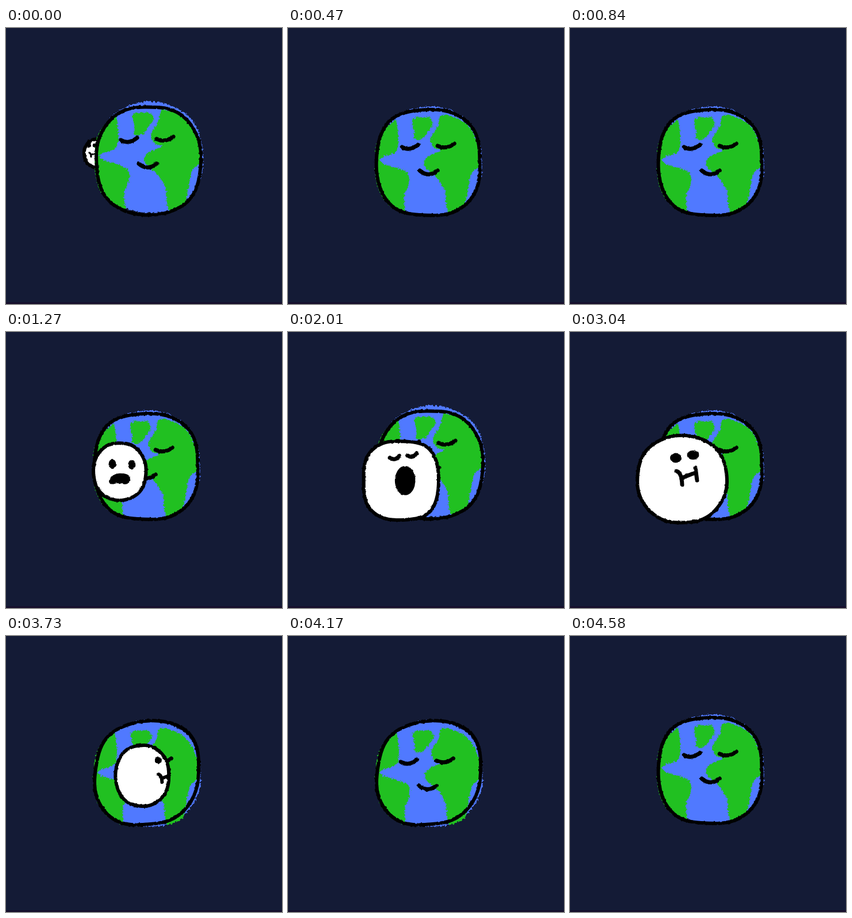
Animation of 480 by 480 pixels, one loop 4.68 s. Source, as an HTML page:

```html
<!DOCTYPE html>
<html lang="en">
<head>
<meta charset="utf-8">
<title>Sleepy planet and its moon</title>
<style>
  html, body { margin: 0; width: 100%; height: 100%; overflow: hidden; background: #141b36; }
  svg { display: block; width: 100vw; height: 100vh; }
</style>
</head>
<body>
<svg viewBox="0 0 480 480">
  <defs>
    <filter id="rough" color-interpolation-filters="sRGB">
      <feTurbulence type="fractalNoise" baseFrequency=".3" numOctaves="2"/>
      <feDisplacementMap in="SourceGraphic" scale="7" xChannelSelector="R" yChannelSelector="G"/>
    </filter>
    <filter id="ink" color-interpolation-filters="sRGB">
      <feTurbulence type="fractalNoise" baseFrequency=".2" numOctaves="2"/>
      <feDisplacementMap in="SourceGraphic" scale="3" xChannelSelector="R" yChannelSelector="G"/>
    </filter>
  </defs>
  <rect width="480" height="480" fill="#141b36"/>
  <rect y="477" width="480" height="3" fill="#170f2c"/>
  <g id="scene" stroke-linecap="round" stroke-linejoin="round"></g>
</svg>
<script>
const scene = document.getElementById('scene');
const FRAMES = 144;

// Closed smooth curve through the midpoints of a flat x,y list
function blob(p) {
  const n = p.length / 2;
  const mid = i => {
    const a = i % n * 2, b = (i + 1) % n * 2;
    return `${(p[a] + p[b]) / 2} ${(p[a + 1] + p[b + 1]) / 2}`;
  };
  let d = 'M' + mid(0);
  for (let i = 1; i <= n; i++) d += `Q${p[i % n * 2]} ${p[i % n * 2 + 1]} ${mid(i)}`;
  return d + 'Z';
}

// Hand-drawn disc: a higher power is boxier, skew leans it
function disc(x, y, rx, ry, power, skew = 0) {
  const pts = [];
  for (let i = 0; i < 40; i++) {
    const a = i * Math.PI / 20, c = Math.cos(a), s = Math.sin(a);
    const r = (Math.abs(c) ** power + Math.abs(s) ** power) ** (-1 / power) *
      (1 - skew * Math.sin(2 * a) + .006 * Math.sin(7 * a + x));
    pts.push(x + rx * r * c, y + ry * r * s);
  }
  return blob(pts);
}

const fill = (d, color = '#000') => `<path d="${d}" fill="${color}"/>`;
const line = (d, width = 6) => `<path d="${d}" fill="none" stroke="#000" stroke-width="${width}"/>`;
const oval = (x, y, rx, ry) => `<ellipse cx="${x}" cy="${y}" rx="${rx}" ry="${ry}"/>`;

// Planet: three drawings shown in the order 0 1 2 1
const rims = [
  [248, 231, 91, 94, 2.4],
  [244, 234, 90, 92, 2.6],
  [245, 238, 90, 90, 2.5, .04]
];
const sea = disc(251, 225, 92, 97, 2.2);
const shore = disc(247, 231, 92.5, 91, 2.55);
const land = [
  [189,135, 194,165, 196,190, 193,211, 162,218, 163,229, 190,235, 216,246, 213,272, 203,288,
   211,330, 140,330, 140,135],
  [269,135, 266,164, 249,185, 259,204, 276,205, 243,217, 239,235, 262,252, 272,267, 279,280,
   279,305, 290,335, 308,330, 318,272, 325,238, 350,238, 350,135],
  [217,148, 236,147, 251,146, 259,159, 246,173, 239,186, 221,187, 225,174]
].map(blob);
const sleep = 'M200 195Q213 203 228 191M262 193Q277 200 291 189M231 236Q246 249 262 236';

function planet(pose) {
  const [x, y, rx, ry] = rims[pose], [x0, y0, rx0, ry0] = rims[0];
  return `<clipPath id="shore"><path d="${shore}"/></clipPath><g filter="url(#rough)">` +
    `<g transform="translate(${x} ${y + 3.5 * pose}) scale(${rx / rx0} ${ry / ry0}) translate(${-x0} ${-y0})">` +
    fill(sea, '#5079ff') +
    `<g clip-path="url(#shore)">${land.map(d => fill(d, '#21c021')).join('')}</g></g></g>` +
    `<g filter="url(#ink)">${line(disc(...rims[pose]))}` +
    `<g transform="translate(${-1.8 * pose} ${12 * pose})">${line(sleep, 7)}</g></g>`;
}

// Moon faces around the moon's centre: art, the radius it is drawn for, boxiness of the disc
const chew = 'M-10 -14Q-1 -12 0 9M-1 -2L22 -11M23 -20L26 2';
const faces = {
  spin: [oval(-11, -45, 10, 11) + oval(19, -45, 10, 11) +
    `<g transform="translate(0 10)">${line(chew, 10)}</g>`, 78, 2.2],
  munch: [oval(-11, -37, 10, 8.5) + oval(19, -42, 10.5, 8) + line(chew, 7), 78, 2.2],
  blink: [line('M-20 -38Q-11 -31 -2 -40M10 -42Q19 -35 28 -45', 7) + line(chew, 7), 78, 2.2],
  sad: [oval(-13, -13, 6.5, 8.5) + oval(21, -12, 6.5, 8.5) +
    fill('M-19 17Q-15 4 0 3Q18 3 18 12Q17 23 8 22Q-2 19 -8 21Q-18 24 -19 17Z'), 46, 2.2],
  yawn: [line('M-19 -39Q-10 -33 -3 -42M11 -43Q20 -37 27 -47', 7) + oval(7, 0, 17.5, 25), 64, 2.8]
};

const small = { x: 199, y: 243, rx: 46, ry: 50, turn: 0 };
const big = { x: 195, y: 256, rx: 78, ry: 76, turn: 0 };

function mix(a, b, t) {
  const out = {};
  for (const k in small) out[k] = a[k] + (b[k] - a[k]) * t;
  return out;
}

// One swing: out on the left, across the front, in again on the right
function orbit(step) {
  if (step > 8) return null;
  const a = (step - 4) * 32.75 * Math.PI / 180, near = Math.cos(a);
  return {
    x: 237 + 102 * Math.sin(a), y: 228 + 15 * near,
    rx: 33 + 13.5 * near, ry: 36 + 17 * near,
    turn: -.5 + .31 * step, face: 'spin', front: near > 0
  };
}

// Brakes in front of the planet, yawns itself big, chews, then swings off
function visit(f) {
  if (f > 110) return { ...mix(big, orbit(4), ((f - 110) / 4) ** 2), face: 'spin', front: true };
  const brakes = [36, 40, 44].filter(s => s <= f).length;
  const grow = Math.min(5, Math.max(0, Math.floor((f - 53) / 3))) / 5;
  const m = mix(mix(orbit(2), small, 1 - .15 ** brakes), big, grow);
  const heave = Math.sin(Math.PI * grow);
  m.y += 8 * heave;
  m.ry += 3 * heave;
  m.face = brakes < 2 ? 'spin' : grow < .4 ? 'sad' : grow < 1 ? 'yawn' : f >= 98 && f < 101 ? 'blink' : 'munch';
  m.front = true;
  return m;
}

function moonAt(f) {
  if (f < 34 || f >= 128) return orbit(f % 16);
  return f < 114 ? visit(f) : orbit(f - 110);
}

function moon({ x, y, rx, ry, face, turn }) {
  const [art, base, power] = faces[face], d = disc(x, y, rx, ry, power);
  const features = turn > 1.3 ? '' :
    `<g clip-path="url(#moon)"><g transform="translate(${x + turn * rx} ${y}) scale(${rx / base})">${art}</g></g>`;
  return `<clipPath id="moon"><path d="${d}"/></clipPath>` +
    `<g filter="url(#ink)">${fill(d, '#fff')}${features}${line(d)}</g>`;
}

// Drawings held for one, two or three frames last 30, 70 or 100 ms
const shots = [];
let last;
for (let f = 0; f < FRAMES; f++) {
  const m = moonAt(f), key = JSON.stringify(m);
  if (f % 3 === 0 || key !== last) shots.push({ pose: [0, 1, 2, 1][Math.floor(f / 3) % 4], m, n: 0 });
  shots[shots.length - 1].n++;
  last = key;
}
let loop = 0;
for (const s of shots) {
  s.start = loop;
  loop += [0, 30, 70, 100][s.n];
}

let shown;
function draw(now) {
  const t = now % loop;
  const s = shots.filter(q => q.start <= t).pop();
  if (s !== shown) {
    shown = s;
    const earth = planet(s.pose), ball = s.m ? moon(s.m) : '';
    scene.innerHTML = s.m && s.m.front ? earth + ball : ball + earth;
  }
}
const began = performance.now();
function tick() {
  draw(performance.now() - began);
  requestAnimationFrame(tick);
}
tick();
</script>
</body>
</html>
```
